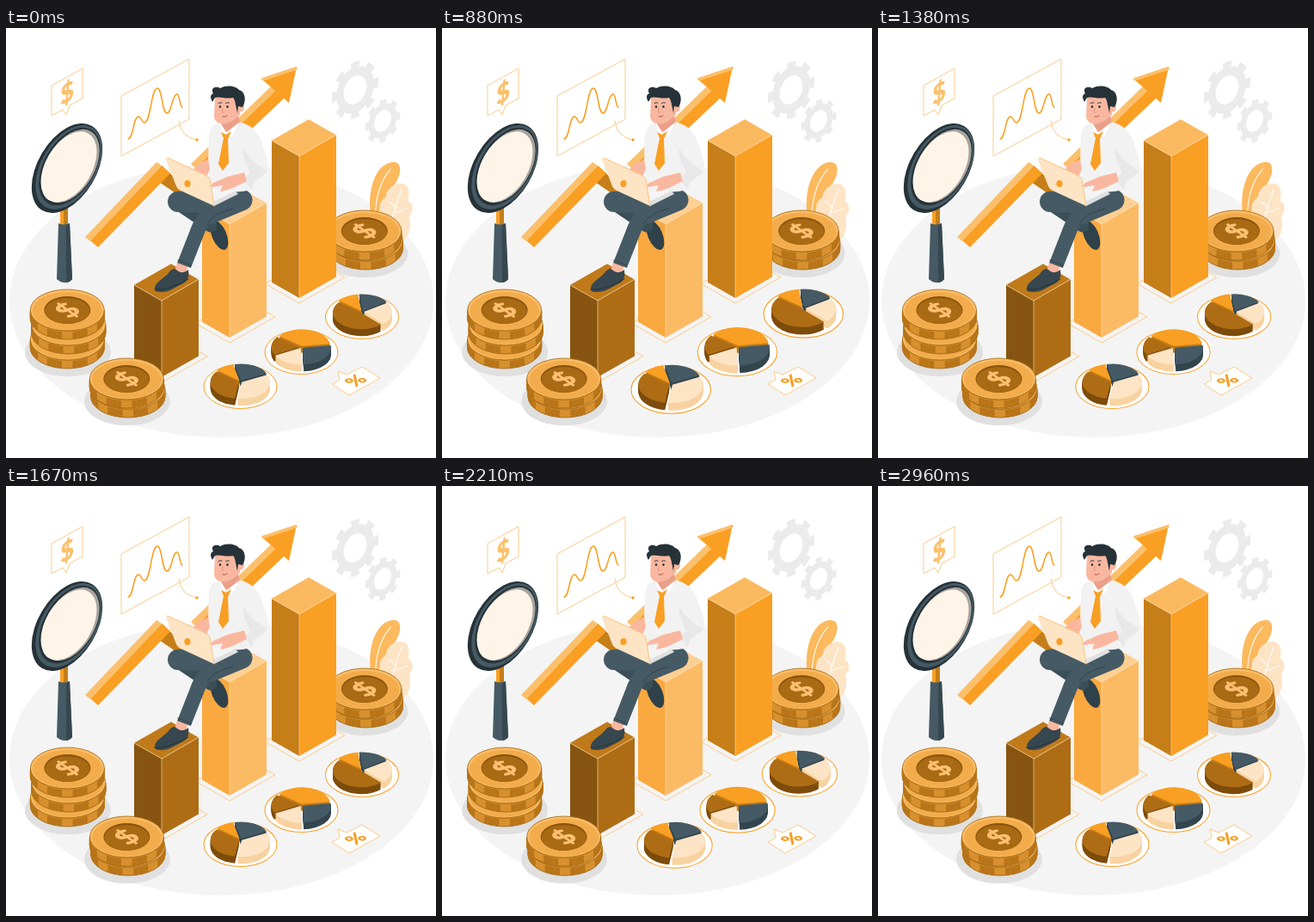
An HTML page for the animation above (3000 ms loop, 500 by 500 pixels).

```html
<!DOCTYPE html>
<html lang="en">
<head>
<meta charset="utf-8">
<title>Growth chart</title>
<style>
html, body { margin: 0; width: 100%; height: 100%; overflow: hidden; background: #fff }
svg { display: block; width: 100vw; height: 100vh }
text { font-family: Lato, "Open Sans", sans-serif; font-weight: 900; text-anchor: middle }
</style>
</head>
<body>
<svg id="stage" viewBox="0 0 500 500"></svg>
<script>
const ORANGE = '#f99f23', LIGHT = '#fcc06c', PALE = '#fbcb8c', CREAM = '#fde4c5',
      SHADE = '#c67e18', BROWN = '#ae6d15', DARK = '#455a64', INK = '#263238', SKIN = '#f9b7a0';

const path = (d, fill, extra = '') => `<path d="${d}" fill="${fill}" ${extra}/>`;
const line = (d, color, width = 1, cap = 'round') =>
  path(d, 'none', `stroke="${color}" stroke-width="${width}" stroke-linecap="${cap}" stroke-linejoin="round"`);
const poly = (points, fill, extra = '') => `<polygon points="${points}" fill="${fill}" ${extra}/>`;
const outline = (points, fill = 'none') => poly(points, fill, `stroke="${PALE}" stroke-linejoin="round"`);
const oval = (x, y, rx, ry, fill, extra = '') =>
  `<ellipse cx="${x}" cy="${y}" rx="${rx}" ry="${ry}" fill="${fill}" ${extra}/>`;
const group = (id, body) => `<g id="${id}">${body}</g>`;
const repeat = (n, draw) => Array.from({ length: n }, (_, i) => draw(i)).join('');
const label = (s, x, y, size, fill, axes) =>
  `<text transform="matrix(${axes} ${x} ${y})" y="${size * .36}" font-size="${size}" fill="${fill}">${s}</text>`;
const FLOOR = '.87 -.5 .87 .5', WALL = '.87 -.5 0 1';

// Curve that is level at every turning point
function wave([first, ...rest]) {
  let [x, y] = first, d = `M${first}`;
  for (const [nx, ny] of rest) {
    const mid = (x + nx) / 2;
    d += `C${mid} ${y} ${mid} ${ny} ${nx} ${ny}`;
    [x, y] = [nx, ny];
  }
  return d;
}

const gear = (x, y, k) =>
  `<g transform="translate(${x} ${y}) rotate(25) scale(${.79 * k} ${1.14 * k})" fill="none" stroke="#ebebeb">
    <circle r="20.5" stroke-width="10"/>
    <circle r="28" stroke-width="7" pathLength="80" stroke-dasharray="5 5"/></g>`;

// (x, y) is the front corner
const diamond = (x, y, left, right) =>
  `${x},${y} ${x - left},${y - left * .57} ${x + right - left},${y - (left + right) * .57} ${x + right},${y - right * .57}`;

function bar(x, top, bottom, lid, left, right) {
  const side = (w, fill) =>
    poly(`${x},${top} ${x + w},${top - Math.abs(w) * .57} ${x + w},${bottom - Math.abs(w) * .57} ${x},${bottom}`, fill);
  return outline(diamond(x, bottom + 6, 40, 53)) + side(-32, left) + side(43, right) +
    poly(diamond(x, top, 32, 43), lid) +
    line(`M${x - 32} ${top - 18}l32 18l43 -25M${x} ${top}V${bottom}`, '#fde0b6', .6);
}

// Folded strip: a light top edge above a wide front
const strip = (x, y, dx, dy) =>
  poly(`${x + 6},${y + 4} ${x + dx + 6},${y + dy + 4} ${x + dx + 16},${y + dy + 13} ${x + 15},${y + 12}`, ORANGE) +
  poly(`${x},${y} ${x + dx},${y + dy} ${x + dx + 6},${y + dy + 4} ${x + 6},${y + 5}`, LIGHT);

const RX = 43, RY = 24, THICK = 10;
const rim = (x, y) => `M${x - RX} ${y}a${RX} ${RY} 0 0 0 ${2 * RX} 0`;
const coin = (x, y) =>
  path(`${rim(x, y)}v${THICK}a${RX} ${RY} 0 0 1 ${-2 * RX} 0z`, '#d8902e', 'stroke="#96600f" stroke-width=".8"') +
  repeat(THICK - 2, k => path(rim(x, y + k + 2), 'none', 'stroke="#b87418" stroke-width="1.3" stroke-dasharray="17 13"')) +
  oval(x, y, RX, RY, '#fbbd68', 'stroke="#a0660f" stroke-width=".8"') +
  oval(x, y + .8, RX - 2.5, RY - 2, '#f3ac4c');

function stack(id, x, y, count, step) {
  const low = (count - 1) * step, nudge = k => 1.5 * Math.sin(k * Math.PI / 2);
  return group(id, oval(x + .5, y + low + 15, RX * 1.16, RY * 1.18, '#e0e0e0') +
    repeat(count, i => coin(x + nudge(count - 1 - i), y + low - i * step)) +
    oval(x, y, 27, 16, '#8a540d') + oval(x, y + 1, 26, 14.8, '#a96a14') +
    label('$', x, y, 32, '#fbc071', FLOOR));
}

// Slices run clockwise from the start angle; each is [colours, degrees]
const brown = [BROWN, '#7d4c0b'], orange = [ORANGE, '#c47b15'],
      dark = [DARK, '#33454d'], cream = [CREAM, '#f8d2a0'];
function pie(x, y, start, shares) {
  const polar = (a, r) => [r * Math.cos(a * Math.PI / 180), .59 * r * Math.sin(a * Math.PI / 180)];
  let from = start;
  const slices = shares.map(([[top, side], size]) => {
    const [ox, oy] = polar(from + size / 2, 2);
    const d = `M0 0L${polar(from, 33)}A33 19.5 0 0 1 ${polar(from += size, 33)}z`;
    const body = repeat(9, k => path(d, k < 8 ? side : top, `transform="translate(${x + ox} ${y + 2 - k + oy})"`));
    return { oy, body };
  });
  return oval(x, y, 42.5, 25.5, '#fff', `stroke="${ORANGE}"`) +
    slices.sort((a, b) => a.oy - b.oy).map(s => s.body).join('');
}

const icons =
  gear(406, 72, 1) + gear(438, 108, .75) +
  outline('53,67 89,47 89,82 74,90 70,101 66,95 53,102') + label('$', 71, 75, 31, LIGHT, WALL) +
  outline('134,79 213,36 213,106 134,149') +
  line(wave([[142, 129], [154, 103], [161, 110], [176, 70], [187, 99], [199, 77], [205, 92]]), ORANGE, 1.5) +
  line('M201 108Q203 127 222 130', PALE) + oval(222, 130, 1.7, 1.7, ORANGE);

const lens = [[71, 163, 1, INK], [73, 162, .94, DARK], [74, 161, .87, INK], [75, 160.5, .82, '#a8a39c'], [73, 161.5, .79, '#fef4e8']];
const magnifier =
  line('M67.5 208V229', SHADE, 9, 'butt') + line('M65 208V229', ORANGE, 4, 'butt') +
  path('M61 227Q67 230 74 227L77 292Q68 300 59 292z', DARK) +
  path('M70 229L74 227L77 292Q74 296 70 296z', '#37474f') +
  lens.map(([x, y, k, fill]) => oval(x, y, 34 * k, 57 * k, fill, `transform="rotate(30.5 ${x} ${y})"`)).join('');

const arrow =
  poly('181,160 196,174 240,205 226,212 178,179', SHADE) +
  strip(92, 243, 83, -87) + strip(215, 158, 93, -90) +
  poly('297,59 338,45 329,87', ORANGE) + line('M299 59.5L337 47', LIGHT, 3.5);

const leaves = group('leaves',
  path('M424 215C421 184 432 158 450 156C462 155 460 170 455 178C448 191 437 198 434 216z', '#fcb95d') +
  line('M430 213Q432 182 448 164', '#fff') +
  path('M436 216C433 205 437 198 443 198C440 191 450 181 458 181C468 180 471 191 468 201C474 205 475 213 469 219C472 231 469 245 458 249L438 240z', CREAM) +
  line('M446 238Q451 210 461 187M452 215L466 210M454 209L446 202', '#fff'));

const legs =
  oval(248, 241, 8.5, 18, '#2f414a', 'transform="rotate(-22 248 241)"') +
  line('M198 203L238 230', '#3b4f59', 15) +
  line('M255 204L200 202', DARK, 24) +
  line('M206 272L201 290', SKIN, 13, 'butt') +
  path('M173 303C173 296 182 292 188 286C192 280 196 278 199 282Q206 287 212 281Q214 293 206 297C196 302 188 308 179 307Q172 307 173 303z', '#37474f') +
  line('M173 304Q187 306 212 292', INK) +
  line('M274 200L238 215', DARK, 25) +
  line('M234 218Q226 226 222 238L207 276', DARK, 17, 'butt') +
  line('M234 228Q239 216 264 210M200 270L215 276', '#33454d');

const body =
  path('M239 115Q243 110 253 111L271 109C286 113 294 121 298 135C303 149 307 158 304 167C299 175 286 179 286 188Q262 194 240 187L235 160C236 143 234 124 239 115z', '#f2f2f2') +
  path('M276 139C274 153 281 160 284 168L277 176L286 188L288 179L304 167C300 163 283 156 276 139z', '#e8e8e8') +
  path('M251 106L269 98L272 110Q266 121 254 121L250 112z', '#eb9f88') +
  path('M249 110L256 121L251 126zM272 109L257 121L263 126z', '#fff') +
  poly('250,121 256,124 262,120 258,129 259,157 252,166 247,158 253,128', ORANGE);

const head =
  path('M243 80L242 104Q246 116 262 109L272 101L274 80z', SKIN) + oval(273, 92, 4, 5.5, SKIN) +
  path('M240 86C236 79 239 77 241 76C237 69 245 67 249 70C256 66 267 67 271 72C278 74 280 84 275 92L270 91L269 99L267 89Q266 83 264 81C256 83 247 79 243 81z', INK) +
  [249, 257.5].map(x => oval(x, 91.5, 1.2, 1.5, INK) + line(`M${x - 2} 87.5Q${x} 86 ${x + 2} 87`, INK, .9)).join('') +
  line('M252 93L251 98L253 98', '#e58e77', .9) + line('M252 103Q255 104 257 102', '#9d4d3f', .9);

const laptop =
  path('M217 165L225 157L235 153L237 164L233 173z', SKIN) +
  poly('236,191 258,181 270,193 242,207', '#e0e0e0') + poly('236,191 258,181 266,190 241,202', '#f4f4f4') +
  path('M188 151L232 171Q236 173 237 176L242 207L203 189Q199 187 198 184L186 153Q186 150 188 151z', CREAM) +
  line('M188 151L232 171Q236 173 237 176L242 207', '#fbc37a') + oval(211, 181, 3.6, 4, ORANGE) +
  path('M277 168L280 178L268 184Q258 189 249 190L252 183L239 185Q237 181 246 178L257 173z', SKIN);

const bars =
  bar(341, 149, 314, '#fbb95f', SHADE, ORANGE) +
  bar(260, 228, 360, '#fdcf93', '#f9a93f', '#fbbb65') +
  bar(181, 317, 406, '#c07a1a', '#875511', BROWN);

const bubble =
  outline('379,414 388,409 386,399 396,403 414,394 435,407 399,427', '#fff') +
  label('%', 406.5, 410, 22, ORANGE, FLOOR);

const pies = group('pies',
  pie(414, 336, 45, [[brown, 173], [orange, 45], [dark, 64], [cream, 78]]) +
  pie(343.5, 377, 88, [[cream, 65], [brown, 64], [orange, 135], [dark, 96]]) +
  pie(272.5, 417, 98, [[brown, 120], [orange, 39], [dark, 77], [cream, 124]]));

const coins = ['coinsA', 'coinsB', 'coinsC'];
document.getElementById('stage').innerHTML =
  oval(250.5, 317, 246.5, 159, '#f4f4f4') + icons + magnifier + arrow + leaves +
  stack(coins[2], 417.5, 236, 2, 11) + bars + legs + body + head + laptop +
  stack(coins[0], 72, 328, 3, 17) + stack(coins[1], 141, 408, 2, 11) + bubble + pies;

const move = (id, value) => document.getElementById(id).setAttribute('transform', value);
const PERIOD = 1500;

function draw() {
  const t = performance.now() % PERIOD;
  const beat = 1 + .1 * Math.exp(-(((t - 955) / 150) ** 2) / 2);
  const sway = Math.cos((t - 800) / PERIOD * 2 * Math.PI);
  move('pies', `translate(343.5 377) scale(${beat}) translate(-343.5 -377)`);
  for (const id of coins) move(id, `translate(${.7 * sway})`);
  move('leaves', `rotate(${.6 * sway} 438 240)`);
  requestAnimationFrame(draw);
}
draw();
</script>
</body>
</html>
```
